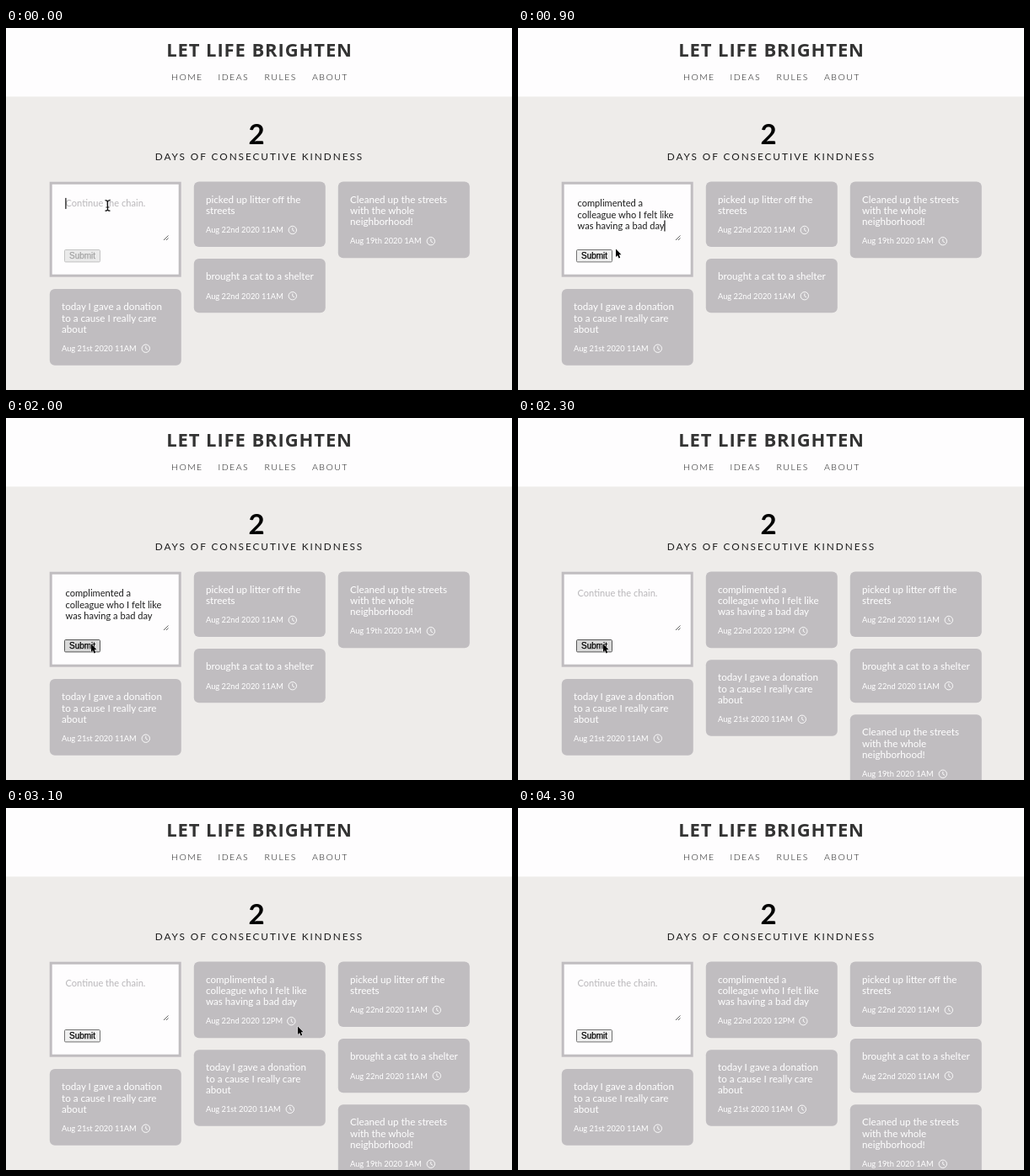
Animation of 600x430 px, one loop 4.6 s. Source, as an HTML page:

```html
<!DOCTYPE html>
<html lang="en">
<head>
<meta charset="utf-8">
<title>Let life brighten</title>
<style>
  html, body { margin: 0; width: 100%; height: 100%; overflow: hidden; background: #eeecea; }
  svg { display: block; width: 600px; height: 430px; }
  text { font-family: Lato, sans-serif; white-space: pre; }
  .title { font: 700 22px "Open Sans", sans-serif; letter-spacing: .9px; fill: #333; text-anchor: middle; }
  .nav { font-size: 10.5px; font-weight: 300; letter-spacing: 1.45px; fill: #111; }
  .count { font-size: 33px; font-weight: 700; text-anchor: middle; }
  .days { font-size: 11.8px; letter-spacing: 1.95px; fill: #1c1c1c; }
  .card { fill: #c0bdc0; }
  .note { font-size: 11.65px; fill: #fff; }
  .date { font-size: 9.3px; fill: #fff; }
  .clock { fill: none; stroke: #fff; stroke-width: .9; }
  .field { font-size: 11.1px; fill: #1c1c1c; }
  .hint { fill: #b9b7ba; }
  .submit { font: 10px "Liberation Sans", Arial, sans-serif; stroke-width: .25; }
</style>
</head>
<body>
<svg id="stage" viewBox="0 0 600 430"></svg>
<script>
const LOOP = 4600, STEP = 100;
const stage = document.getElementById("stage");

function add(parent, tag, attrs = {}, text) {
  const node = document.createElementNS("http://www.w3.org/2000/svg", tag);
  set(node, attrs);
  if (text !== undefined) node.textContent = text;
  parent.appendChild(node);
  return node;
}
function set(node, attrs) {
  for (const key in attrs) node.setAttribute(key, attrs[key]);
}
function show(node, on) {
  node.setAttribute("display", on ? "inline" : "none");
}
function label(parent, cls, x, y, text) {
  return add(parent, "text", { class: cls, x, y }, text);
}

// Header
add(stage, "rect", { width: 600, height: 430, fill: "#eeecea" });
add(stage, "rect", { width: 600, height: 81.5, fill: "#fefdfe" });
label(stage, "title", 300.6, 34, "LET LIFE BRIGHTEN");
[["HOME", 196], ["IDEAS", 251.5], ["RULES", 306.5], ["ABOUT", 363]]
  .forEach(([name, x]) => label(stage, "nav", x, 62.2, name));
label(stage, "count", 297, 137.5, "2");
label(stage, "days", 176.7, 156.6, "DAYS OF CONSECUTIVE KINDNESS");

// Cards
const typed = ["complimented a", "colleague who I felt like", "was having a bad day"];
const notes = {
  fresh: { lines: typed, date: "Aug 22nd 2020 12PM", icon: 115.5 },
  donation: { lines: ["today I gave a donation", "to a cause I really care", "about"], date: "Aug 21st 2020 11AM", icon: 114 },
  litter: { lines: ["picked up litter off the", "streets"], date: "Aug 22nd 2020 11AM", icon: 117 },
  cat: { lines: ["brought a cat to a shelter"], date: "Aug 22nd 2020 11AM", icon: 117 },
  streets: { lines: ["Cleaned up the streets", "with the whole", "neighborhood!"], date: "Aug 19th 2020 1AM", icon: 110 }
};

function drawCard(parent, x, y, note) {
  const height = 51 + 13.2 * note.lines.length;
  const g = add(parent, "g", { transform: `translate(${x} ${y})` });
  add(g, "rect", { class: "card", width: 156, height, rx: 6 });
  note.lines.forEach((line, i) => label(g, "note", 14.2, 25.2 + 13.3 * i, line));
  label(g, "date", 14.2, height - 16.7, note.date);
  const cx = note.icon, cy = height - 20;
  add(g, "circle", { class: "clock", cx, cy, r: 4.7 });
  add(g, "path", { class: "clock", d: `M${cx} ${cy - 2.8}v3l2.2 1.4` });
  return height;
}
function drawColumns(columns) {
  const g = add(stage, "g");
  columns.forEach((names, i) => {
    let y = i ? 182.6 : 310.1;
    for (const name of names) y += drawCard(g, 51.8 + 171 * i, y, notes[name]) + 14;
  });
  return g;
}
const before = drawColumns([["donation"], ["litter", "cat"], ["streets"]]);
const after = drawColumns([["donation"], ["fresh", "donation"], ["litter", "cat", "streets"]]);

// Form
add(stage, "rect", { x: 53.2, y: 184.2, width: 153, height: 110, fill: "#fefdfe", stroke: "#c0bdc0", "stroke-width": 3 });
const hint = label(stage, "field hint", 70.5, 212.3, "Continue the chain.");
const rows = typed.map((_, i) => label(stage, "field", 70.5, 212.3 + 13.3 * i, ""));
const caret = add(stage, "rect", { width: 1.2, height: 13, fill: "#111" });
add(stage, "path", { d: "M187 252l5.5-5.5M190 252l2.5-2.5", stroke: "#555", "stroke-width": .9 });
const button = add(stage, "rect", { x: 69.5, y: 263.5, width: 42, height: 14.4, rx: 1.2 });
const caption = label(stage, "submit", 75, 274.3, "Submit");

// Pointers
const beam = add(stage, "path", {
  d: "M117.5 204.6q3 0 3 2q0-2 3-2M120.5 206.5v9M117.5 217.2q3 0 3-2q0 2 3 2M118.5 213h4",
  fill: "none", stroke: "#111", "stroke-width": 1.2
});
const arrow = add(stage, "path", {
  d: "M0 .4V10L2.1 8L3.6 11.4L5.2 10.7L3.8 7.2H6.5Z",
  fill: "#000", stroke: "#fff", "stroke-width": .7, "paint-order": "stroke"
});

// Pointer path: time, x, y
const path = [
  [900, 116, 262], [1000, 118, 269], [1100, 112, 273], [1300, 99, 268.5],
  [1400, 99, 268.5], [1500, 101, 268], [2500, 101, 268], [2600, 112, 258],
  [2800, 205, 210], [2900, 280, 203], [3000, 354, 235], [3100, 346, 259],
  [3200, 318, 281], [3400, 200, 230], [3500, 140, 164], [3700, 93, 192],
  [3900, 93, 192], [4000, 150, 230], [4100, 270, 258], [4200, 343, 131]
];
function pointerAt(t) {
  const i = path.findIndex(p => p[0] >= t);
  if (i < 0 || t < path[0][0]) return null;
  const b = path[i], a = path[Math.max(0, i - 1)];
  const k = b[0] === a[0] ? 1 : (t - a[0]) / (b[0] - a[0]);
  return [a[1] + (b[1] - a[1]) * k, a[2] + (b[2] - a[2]) * k];
}

function buttonStyle(t, point) {
  if (t < 400) return ["#eaeaea", "#c3c3c3", "#a3a3a3"];
  const over = point && point[0] > 69 && point[0] < 112 && point[1] > 263 && point[1] < 278;
  if (over && t === 1900) return ["#c9c9c9", "#444", "#000"];
  return over ? ["#d9d9d9", "#555", "#000"] : ["#efefef", "#707070", "#000"];
}

function draw(time) {
  const t = Math.floor((time % LOOP) / STEP) * STEP;
  const posted = t >= 2300;
  show(before, !posted);
  show(after, posted);

  const total = typed.join("").length;
  let left = t < 400 || posted ? 0 : Math.min(total, Math.ceil(total * (t - 300) / 600));
  show(hint, left === 0);
  let last = 0;
  rows.forEach((row, i) => {
    const part = typed[i].slice(0, left);
    row.textContent = part;
    if (part) last = i;
    left -= part.length;
    left = Math.max(0, left);
  });

  const caretOn = t < 200 || (t >= 400 && t < 1200) || (t >= 1500 && t < 2000);
  show(caret, caretOn);
  const end = rows[last].textContent ? rows[last].getComputedTextLength() : 0;
  set(caret, { x: 70.3 + end, y: 201.9 + 13.3 * last });

  const point = pointerAt(t);
  show(beam, t < 400);
  show(arrow, point);
  if (point) set(arrow, { transform: `translate(${point[0]} ${point[1]})` });

  const [fill, stroke, ink] = buttonStyle(t, point);
  set(button, { fill, stroke });
  set(caption, { fill: ink, stroke: ink });
}

const start = performance.now();
function tick() {
  draw(performance.now() - start);
  requestAnimationFrame(tick);
}
tick();
</script>
</body>
</html>
```
